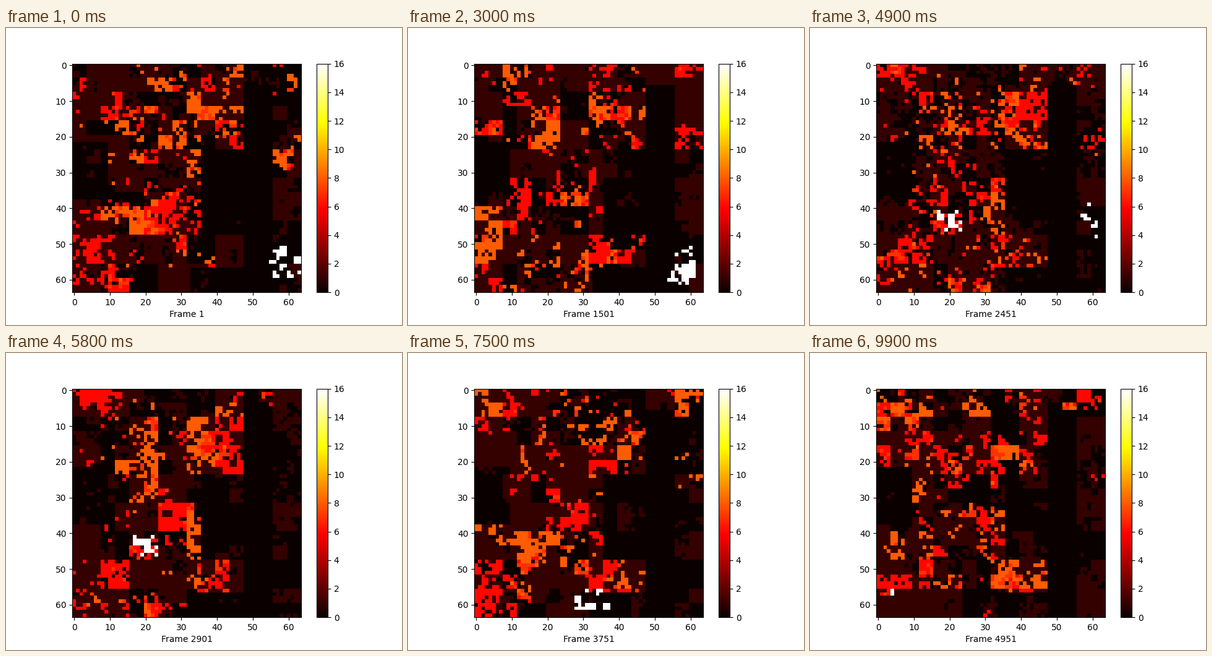
Recreate the animation shown at these times as a matplotlib script. Size 640 by 480 pixels, loop 10 s.

```python
import numpy as np
import matplotlib.pyplot as plt
from matplotlib.animation import FuncAnimation

N = 64
FRAMES = 100
STRIDE = 50
HOT_SHARE = 0.16

# Step, centre and cell count of the white colony as it moves about.
COLONY = [(0, 59, 55, 26), (15, 59, 57, 32), (30, 58, 57, 36),
          (40, 60, 43, 20), (58, 20, 44, 20), (75, 32, 60, 22),
          (99, 2, 57, 2)]
STEPS = [c[0] for c in COLONY]

# Lasting regions: cold boxes (x, y, width, height) and warm centres.
COLD = [(0, 22, 10, 16), (36, 24, 20, 24), (48, 6, 8, 58), (33, 57, 15, 7)]
WARM = [(20, 20), (35, 15), (60, 22), (13, 43), (4, 57),
        (5, 4), (43, 12), (58, 3), (27, 38), (36, 53)]

yy, xx = np.mgrid[:N, :N]


def ranks(field):
    """Replace values by their even ranks in 0..1."""
    order = field.ravel().argsort().argsort()
    return (order.reshape(field.shape) + 0.5) / field.size


def noise(rng, **weights):
    """Blocky noise; each key is 's' plus a block size."""
    total = np.zeros((N, N))
    for name, weight in weights.items():
        size = int(name[1:])
        cells = rng.random((N // size, N // size))
        total += weight * np.kron(cells, np.ones((size, size)))
    return ranks(total)


cold = np.zeros((N, N))
for x, y, w, h in COLD:
    cold[y:y + h, x:x + w] = 1
warm = sum(np.exp(-((xx - x)**2 + (yy - y)**2) / 36) for x, y in WARM)


def make_grid(seed, x, y, count):
    rng = np.random.default_rng(seed)

    ground = noise(rng, s16=0.2, s8=0.5, s4=0.4, s2=0.2, s1=0.15)
    drift = 0.2 * (xx >= 48)
    grid = (ground - 0.6 * cold - drift > 0.32).astype(float)

    heat = noise(rng, s8=0.4, s4=0.5, s2=0.4, s1=0.4)
    heat = ranks(heat + 0.35 * warm - 0.5 * cold - drift)
    tint = noise(rng, s8=0.6, s4=0.4, s2=0.2, s1=0.2)
    kind = np.select([tint < 0.55, tint < 0.67], [6, 7], 8)
    grid = np.where(heat > 1 - HOT_SHARE, kind, grid)

    reach = np.hypot(xx - x, yy - y) + 7 * noise(rng, s2=0.6, s1=0.4)
    grid[ranks(reach) * N**2 < count] = 16
    return grid


grids = [make_grid(40 + i, *c[1:]) for i, c in enumerate(COLONY)]
rng = np.random.default_rng(7)
turns = [noise(rng, s8=0.3, s4=0.4, s2=0.3, s1=0.4) for _ in STEPS[1:]]


def grid_at(i):
    """Cells flip one patch after another from one grid to the next."""
    k = min(np.searchsorted(STEPS, i, side="right") - 1, len(STEPS) - 2)
    t = (i - STEPS[k]) / (STEPS[k + 1] - STEPS[k])
    return np.where(t > turns[k], grids[k + 1], grids[k])


fig, ax = plt.subplots(figsize=(6.4, 4.8), dpi=100)
image = ax.imshow(grid_at(0), cmap="hot", vmin=0, vmax=16,
                  interpolation="nearest")
fig.colorbar(image)
label = ax.set_xlabel("Frame 1")


def update(i):
    image.set_data(grid_at(i))
    label.set_text(f"Frame {i * STRIDE + 1}")
    return image, label


anim = FuncAnimation(fig, update, frames=FRAMES, interval=100,
                     repeat=True, repeat_delay=0)
plt.show()
```
